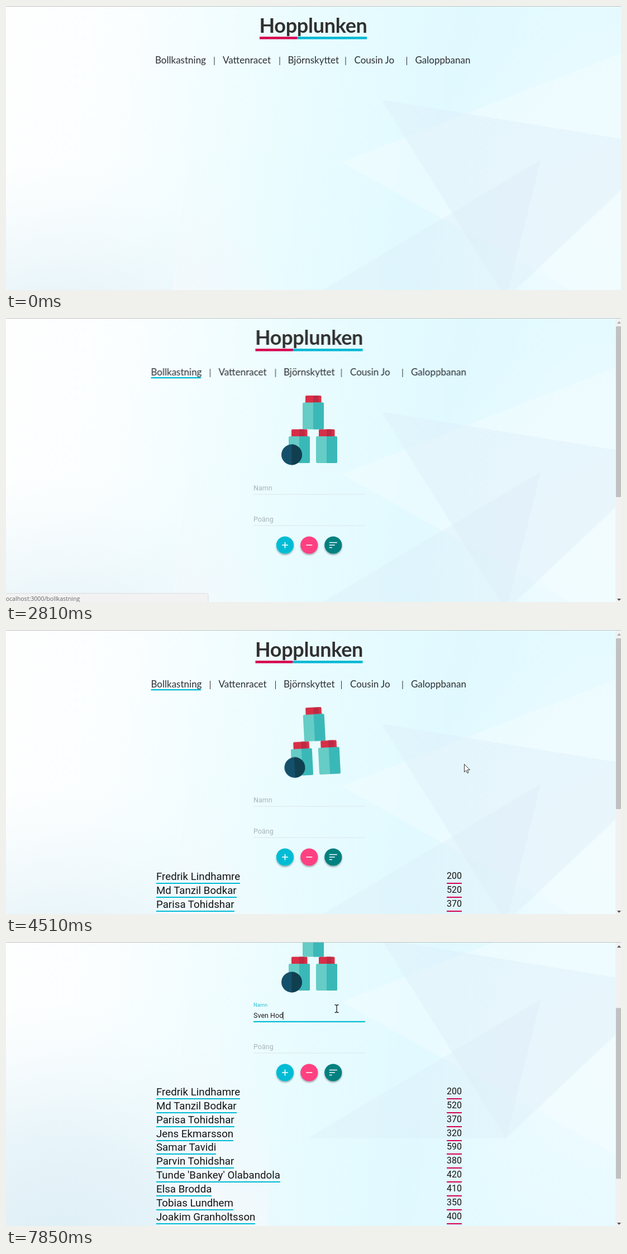
Write an HTML page that moves like this. It is 1101 px wide and 509 px high and loops after 8 s.

```html
<!DOCTYPE html>
<html lang="sv">
<head>
<meta charset="utf-8">
<title>Hopplunken</title>
<style>
  html, body { margin: 0; width: 100%; height: 100%; overflow: hidden; background: #fff; }
  #stage { position: fixed; left: 0; top: 0; width: 1101px; height: 509px; overflow: hidden; }
  #page, #list, #stage svg { position: absolute; left: 0; top: 0; }
  #page { width: 1101px; height: 807px; }
  svg { display: block; }
  text { white-space: pre; }
  .title { font: 700 36px Lato, sans-serif; fill: #303030; letter-spacing: -.3px; text-anchor: middle; }
  .nav { font: 400 17px Lato, sans-serif; fill: #2b2f33; }
  .field { font: 400 12.5px Roboto, sans-serif; fill: #a9b4b7; }
  .status { font: 400 10.6px "Open Sans", sans-serif; fill: #666; }
  .name, .score { position: absolute; white-space: pre; color: #141414; font-family: Roboto, sans-serif; }
  .name { left: 269px; font-size: 18.72px; line-height: 22px; border-bottom: 2.4px solid #00bcd4; }
  .score { left: 789px; font-size: 16px; line-height: 19px; padding-bottom: 3px; border-bottom: 2.4px solid #d5004f; }
  #trophy { transform-origin: 550px 271.5px; }
  #cans { transform-origin: 543px 139px; }
  #focusLine { transform-origin: 543px 316px; }
</style>
</head>
<body>
<div id="stage">
  <div id="page">
    <svg width="1101" height="807" viewBox="0 0 1101 807">
      <defs>
        <linearGradient id="sky" gradientUnits="userSpaceOnUse" x1="0" y1="0" x2="1000" y2="180">
          <stop stop-color="#fefefe"/><stop offset=".2" stop-color="#fbfeff"/>
          <stop offset=".55" stop-color="#e9fcff"/><stop offset=".8" stop-color="#e0f9ff"/>
          <stop offset="1" stop-color="#e5faff"/>
        </linearGradient>
        <radialGradient id="mist" gradientUnits="userSpaceOnUse" cx="90" cy="760" r="480">
          <stop stop-color="#dbedf5"/><stop offset=".5" stop-color="#e3f2f8" stop-opacity=".8"/>
          <stop offset="1" stop-color="#eef8fb" stop-opacity="0"/>
        </radialGradient>
        <radialGradient id="glow" gradientUnits="userSpaceOnUse" cx="1090" cy="400" r="380">
          <stop stop-color="#f0fbff"/><stop offset="1" stop-color="#effcff" stop-opacity="0"/>
        </radialGradient>
        <linearGradient id="pane" gradientUnits="userSpaceOnUse" x1="300" y1="500" x2="450" y2="400">
          <stop stop-color="#f3f9fd"/><stop offset="1" stop-color="#f1fafd" stop-opacity="0"/>
        </linearGradient>
        <clipPath id="bowl"><path d="M493 139H607V222A57 57 0 0 1 493 222Z"/></clipPath>
        <filter id="shade" x="-30%" y="-30%" width="160%" height="170%">
          <feDropShadow dx="0" dy="2" stdDeviation="1.6" flood-opacity=".36"/>
        </filter>
      </defs>

      <rect width="1101" height="807" fill="url(#sky)"/>
      <rect width="1101" height="807" fill="url(#mist)"/>
      <rect width="1101" height="807" fill="url(#glow)"/>
      <path d="M1101 85L600 280L1101 560Z" fill="#f4fdff" opacity=".4"/>
      <path d="M672 168L1101 238V330L895 525Z" fill="#dcecf8" opacity=".42"/>
      <path d="M958 275L895 525L540 525Z" fill="#d9ecf7" opacity=".35"/>
      <path d="M327 270L298 509L262 807H470V270Z" fill="url(#pane)"/>

      <g id="head">
        <text class="title" x="550" y="48">Hopplunken</text>
        <path d="M454 55h67v4.5h-67z" fill="#d5004f"/>
        <path d="M521 55h125v4.5H521z" fill="#00b8d4"/>
        <g id="nav" class="nav"></g>
        <rect id="hover" x="267" y="106" width="89.5" height="2.3" fill="#00bcd4"/>
      </g>

      <g id="trophy">
        <path fill="#efbf00" fill-rule="evenodd" d="M493 160H468.500a33.500 33.500 0 0 0 0 67H493ZM480 177H467.500a16.500 16.500 0 0 0 0 33.500H480Z"/>
        <path fill="#efbf00" fill-rule="evenodd" d="M607 160H631.500a33.500 33.500 0 0 1 0 67H607ZM620 177H632.500a16.500 16.500 0 0 1 0 33.500H620Z"/>
        <path fill="#d0a600" d="M485 160h8v67h-8zM607 160h7v67h-7z"/>
        <g clip-path="url(#bowl)">
          <path fill="#c49900" d="M493 139H607V280H493z"/>
          <path fill="#efbf00" d="M493 139H591V222A46 46 0 0 1 545 268H493Z"/>
          <path fill="#c9a400" d="M493 178h98v40h-98z"/>
          <path fill="#a98400" d="M591 178h16v40h-16z"/>
        </g>
        <rect x="511" y="150" width="8" height="85" rx="4" fill="#fae88c"/>
        <path fill="#cda600" d="M533 279H567V298Q559 299 559 307V356H541V307Q541 299 533 298Z"/>
        <path fill="#c09600" d="M533 277h34v13h-34z"/>
        <path fill="#59361e" d="M509 374V362q0-6 6-6h70q6 0 6 6v12z"/>
        <path fill="#684400" d="M509 366V362q0-6 6-6h59q5 3 5 10z"/>
        <path fill="#684400" d="M491 374h105v30H491z"/>
        <path fill="#59361e" d="M596 374h12v30h-12z"/>
      </g>

      <g id="game">
        <g id="cans"></g>
        <path d="M443 316h200.500M443 372h200.500" stroke="#dce6e8"/>
        <rect id="focusLine" x="443" y="314.700" width="200" height="2.200" fill="#00bcd4"/>
        <g id="label"><text class="field" id="labelText">Namn</text></g>
        <text class="field" x="443" y="365">Poäng</text>
        <text class="field" id="typed" x="443" y="309" style="fill:#222"></text>
        <rect id="caret" x="443" y="298" width="1" height="14" fill="#222"/>
        <g id="buttons" fill="none" stroke="#fff" stroke-width="1.600"></g>
      </g>
    </svg>
    <div id="list"></div>
  </div>

  <svg width="1101" height="509" viewBox="0 0 1101 509">
    <g id="bar">
      <path fill="#f1f1f1" d="M1091 0h10v509h-10z"/>
      <rect id="thumb" x="1092" y="15" width="9" height="306" fill="#c1c1c1"/>
      <path id="up" fill="#555" d="M1094 10l3.500-4 3.500 4z"/>
      <path fill="#555" d="M1094 503l3.500 4 3.500-4z"/>
    </g>
    <path fill="#bdc1c3" d="M0 0h1101v1H0z"/>
    <g id="status">
      <path d="M-1 493.500H359q3 0 3 3V510H-1z" fill="#f2f2f2" stroke="#dcdcdc"/>
      <text class="status" x="-3" y="507">localhost:3000/bollkastning</text>
    </g>
    <g id="cursor">
      <path id="arrow" d="M.5.5v14l3.300-3 2.200 5 2-.9-2.100-4.900h4.600z" fill="#fff" stroke="#333"/>
      <path id="beam" d="M-3.500-6.500q3.500 0 3.500 2 0-2 3.500-2M0-5V6M-3.500 7.500q3.500 0 3.500-2 0 2 3.500 2" fill="none" stroke="#222" stroke-width="1.300"/>
    </g>
  </svg>
</div>

<script>
const LOOP = 8000, OPEN = 2810, FOCUS = 5980, HOLD = 'steps(1, end)';
const $ = id => document.getElementById(id);

// Static parts built from short lists
const nav = [['Bollkastning', 267], ['Vattenracet', 388], ['Björnskyttet', 504.5], ['Cousin Jo', 623.5], ['Galoppbanan', 732.5]];
$('nav').innerHTML = nav.map(([label, x]) => `<text x="${x}" y="103">${label}</text>`).join('') +
  [372.5, 489.5, 607.5, 717].map(x => `<rect x="${x}" y="91" width="1" height="15"/>`).join('');

const can = (x, y) => `
  <rect x="${x + 5}" y="${y}" width="28.5" height="15" rx="2" fill="#d72f47"/>
  <path d="M${x + 19} ${y}h7.500q2 0 2 2v11h-9.500z" fill="#be2943"/>
  <rect x="${x}" y="${y + 12.5}" width="38" height="48" rx="2.500" fill="#66ccc6"/>
  <path d="M${x + 19} ${y + 12.5}h16.500q2.500 0 2.500 2.500v43q0 2.500-2.500 2.500h-16.500z" fill="#3ab8b8"/>`;
$('cans').innerHTML = can(531, 139) + can(506, 199.5) + can(555, 199.5) +
  '<circle cx="511.500" cy="245" r="18.500" fill="#15506a"/><path d="M511.500 226.500a18.500 18.500 0 0 1 0 37z" fill="#103f50"/>';

const buttons = [[499.5, '#00bcd4', 'M-5.500 0h11M0-5.500v11'], [542.8, '#ff4081', 'M-5.500 0h11'],
  [585.8, '#008080', 'M-7-4.500h14M-7 0h10M-7 4.500h5']];
$('buttons').innerHTML = buttons.map(([x, color, icon]) => `<g transform="translate(${x} 407)">
  <circle r="15.600" fill="${color}" stroke="none" filter="url(#shade)"/><path d="${icon}"/></g>`).join('');

const results = [['Fredrik Lindhamre', 200], ['Md Tanzil Bodkar', 520], ['Parisa Tohidshar', 370], ['Jens Ekmarsson', 320],
  ['Samar Tavidi', 590], ['Parvin Tohidshar', 380], ["Tunde 'Bankey' Olabandola", 420], ['Elsa Brodda', 410],
  ['Tobias Lundhem', 350], ['Joakim Granholtsson', 400]];
$('list').innerHTML = results.map(([name, score], i) => {
  const top = `style="top:${431 + i * 24.85}px"`;
  return `<span class="name" ${top}>${name}</span><span class="score" ${top}>${score}</span>`;
}).join('');

// Motion: each step is [ms, properties, easing to the next step]
function play(el, steps) {
  const all = [...steps];
  if (all[0][0] > 0) all.unshift([0, all[0][1]]);
  if (all.at(-1)[0] < LOOP) all.push([LOOP, all.at(-1)[1]]);
  el.animate(all.map(([ms, props, easing = 'linear']) => ({ offset: ms / LOOP, easing, ...props })),
    { duration: LOOP, iterations: Infinity });
}
const fade = (id, steps) => play($(id), steps.map(([ms, opacity, easing]) => [ms, { opacity }, easing]));
const move = (id, steps) => play($(id), steps.map(([ms, x, y, easing]) =>
  [ms, { transform: `translate(${x}px, ${y}px)` }, easing]));
const show = (id, from, to = LOOP) => fade(id, [[0, 0, HOLD], [from, 1, HOLD], ...(to < LOOP ? [[to, 0, HOLD]] : [])]);

show('trophy', 80, OPEN);
play($('trophy'), [[80, 1], [830, .95], [1580, 1]].map(([ms, s]) => [ms, { transform: `scale(${s})` }, 'ease-in-out']));

['game', 'bar'].forEach(id => show(id, OPEN));
move('head', [[0, 0, 0, HOLD], [OPEN, -7.5, 0, HOLD]]);
fade('hover', [[1760, 0], [2090, 1]]);
fade('status', [[2250, 0], [2400, 1], [3670, 1], [3820, 0]]);

fade('list', [[0, 0, HOLD], [OPEN, 0], [3250, 1]]);
move('list', [[OPEN, 0, -40, 'cubic-bezier(.215,.61,.355,1)'], [3670, 0, 0]]);

const swing = [0, 15, -10, 5, -5, 0];
play($('cans'), swing.map((deg, i) => [3660 + i * 200, { transform: `rotate(${deg}deg)` }, 'ease']));

const scroll = [[4590, 0], [5060, 134], [5290, 173]];
move('page', scroll.map(([ms, y]) => [ms, 0, -y]));
move('thumb', scroll.map(([ms, y]) => [ms, 0, y * .597]));
fade('up', [[0, .45, HOLD], [4590, 1, HOLD]]);

show('cursor', 400);
move('cursor', [[400, 998, 478], [690, 930, 340], [850, 835, 285], [1200, 640, 190], [1540, 445, 111], [1640, 445, 111],
  [1870, 307, 89], [2870, 307, 89], [3300, 300, 111], [3600, 300, 111], [4440, 808, 235], [4510, 820, 240],
  [5060, 814, 259], [5290, 791, 236], [5830, 592, 119]]);
show('arrow', 0, 5700);
show('beam', 5700);

// Focus on the name field
const lift = (y, size) => ({ transform: `translate(443px, ${y}px) scale(${size})` });
play($('label'), [[FOCUS, lift(309, 1), 'ease-out'], [FOCUS + 220, lift(288.5, .75)]]);
play($('labelText'), [[FOCUS, { fill: '#a9b4b7' }], [FOCUS + 220, { fill: '#2cc0d4' }]]);
play($('focusLine'), [[FOCUS, { transform: 'scaleX(0)' }, 'ease-out'], [FOCUS + 450, { transform: 'scaleX(1)' }]]);

// Typing
const entry = 'Sven Hod', keys = [6690, 6840, 6990, 7150, 7300, 7530, 7700, 7850];
$('typed').textContent = entry;
const widths = keys.map((_, i) => $('typed').getSubStringLength(0, i + 1));
$('typed').innerHTML = [...entry].map(c => `<tspan>${c}</tspan>`).join('');
[...$('typed').children].forEach((span, i) =>
  play(span, [[0, { fillOpacity: 0 }, HOLD], [keys[i], { fillOpacity: 1 }, HOLD]]));
move('caret', [[0, 0, 0, HOLD], ...keys.map((ms, i) => [ms, widths[i] - .5, 0, HOLD])]);
fade('caret', [[0, 0, HOLD], [FOCUS, 1, HOLD], [FOCUS + 530, 0, HOLD], [keys[0], 1, HOLD]]);
</script>
</body>
</html>
```
